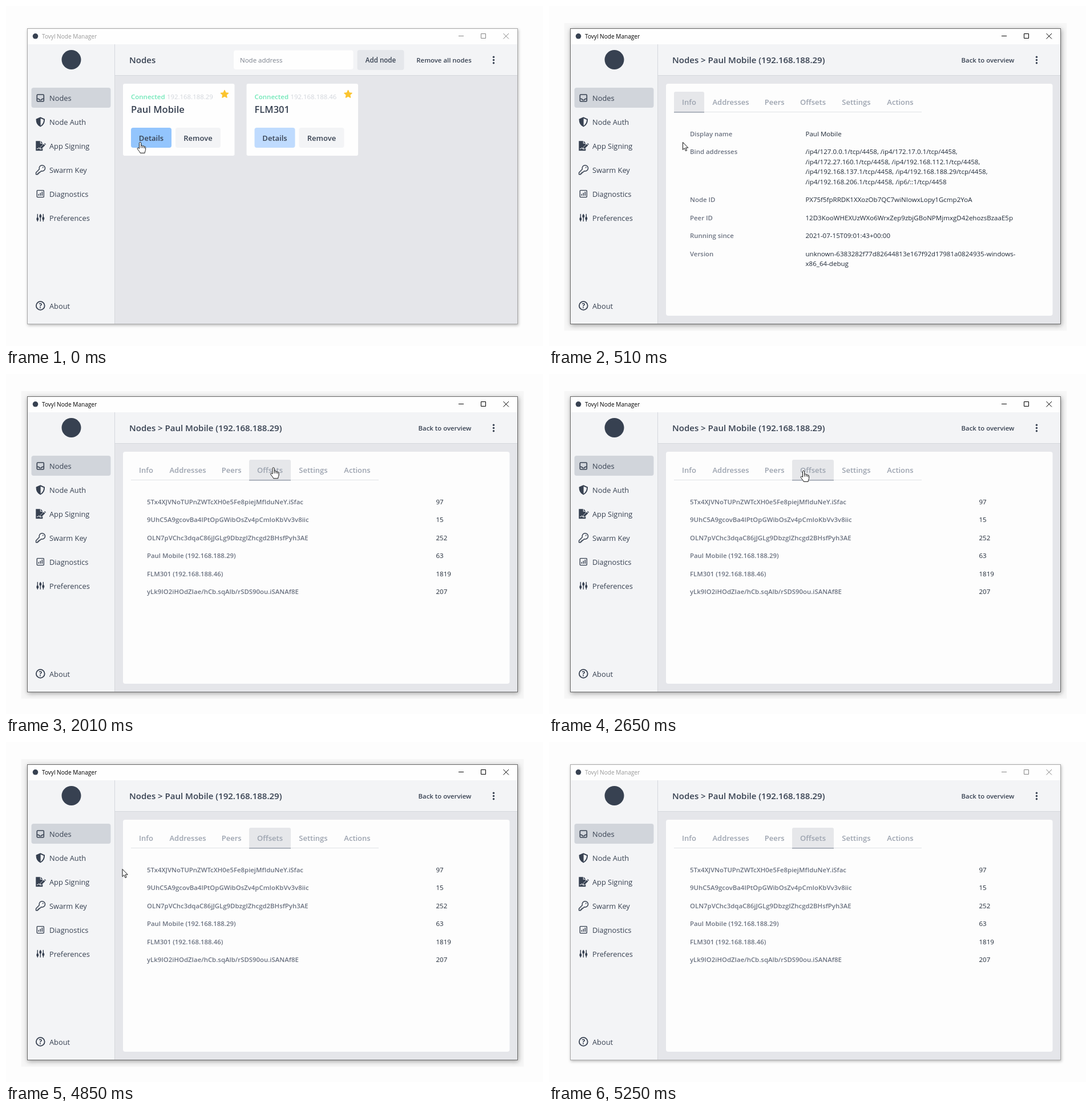
Write an HTML page that moves like this. It is 941 by 595 pixels and loops after 8 s.

```html
<!DOCTYPE html>
<html lang="en">
<head>
<meta charset="utf-8">
<title>Node Manager</title>
<style>
html, body { margin: 0; width: 100%; height: 100%; overflow: hidden; background: #fdfdfd; }
svg { position: absolute; left: 0; top: 0; font-family: "Open Sans", "Noto Sans", sans-serif; }
#window {
  position: absolute; left: 37px; top: 39px; width: 860px; height: 518px;
  box-sizing: border-box; background: #fefefe; border: 1px solid #a8a8a8;
  box-shadow: 1px 2px 5px rgba(0, 0, 0, .27);
}
#window.active {
  border-color: #686868;
  box-shadow: 1px 2px 8px rgba(0, 0, 0, .36), 0 1px 1px 10px rgba(0, 0, 0, .026);
}
#chrome { fill: #999; stroke: #858585; }
#chrome.active { fill: #000; stroke: #000; }
</style>
</head>
<body>
<div id="window"></div>
<svg id="stage" width="941" height="595" viewBox="0 0 941 595"></svg>
<script>
const INK = '#374151', MUTED = '#6b7280', PALE = '#9ca3af', SMALL = 11.4, VALUE = 11.55;
const DEVICE = 'Paul Mobile', IP = '192.168.188.29';

const rect = (x, y, w, h, fill, r = 0, extra = '') =>
  `<rect x="${x}" y="${y}" width="${w}" height="${h}" rx="${r}" fill="${fill}" ${extra}/>`;
const text = (x, y, str, size, fill = INK, weight = 400, anchor = 'start') =>
  `<text x="${x}" y="${y}" font-size="${size}" fill="${fill}" font-weight="${weight}" text-anchor="${anchor}">${str}</text>`;
const line = (d, width = 1.6, color = INK) =>
  `<path d="${d}" fill="none" stroke="${color}" stroke-width="${width}" stroke-linecap="round" stroke-linejoin="round"/>`;
const shape = (d, fill = INK) => `<path d="${d}" fill="${fill}"/>`;
const group = (id, body) => `<g id="${id}">${body}</g>`;
const button = (x, y, w, label, fill, size, id = '') =>
  rect(x, y, w, 35, fill, 4, id && `id="${id}"`) +
  text(x + w / 2, y + (size > 12 ? 22.5 : 21.5), label, size, INK, 600, 'middle');

// Icons are drawn around the middle of their row
const icons = {
  'Nodes': line('M-4.5-6h9a1.5 1.5 0 0 1 1.5 1.5v9a1.5 1.5 0 0 1-1.5 1.5h-9a1.5 1.5 0 0 1-1.5-1.5v-9a1.5 1.5 0 0 1 1.5-1.5ZM-6 1.5h3l1.5 2h3l1.5-2h3'),
  'Node Auth': line('M0-7.4 6.8-4.6C6.8 1 4.5 5.5 0 7.6-4.5 5.5-6.8 1-6.8-4.6Z', 1.9) +
    shape('M.3-7V7.5C-4.5 5.5-6.8 1-6.8-4.6Z'),
  'App Signing': shape('M-8-8.5H-.5V-4H4V-2L-1 3V6H2L4 4V8.5H-8Z') + shape('M.5-8.5 4-5H.5Z') +
    shape('M0 5V2.8L6-3.2 8.2-1 2.2 5Z') + shape('M6.7-4 7.6-4.9 9.8-2.7 8.9-1.8Z') +
    line('M-6 5h2l1-2 1.5 2h2', 1, '#f3f4f6'),
  'Swarm Key': line('M-1.9-1.2A5.2 5.2 0 1 1 1.4 2.1L-.6 4.2H-2.6V6.2H-4.6V8H-7.7V4.8Z', 1.5) +
    '<circle cx="4.4" cy="-4.2" r=".9" fill="#374151"/>',
  'Diagnostics': line('M-5-6H5a1 1 0 0 1 1 1V5a1 1 0 0 1-1 1H-5a1 1 0 0 1-1-1V-5a1 1 0 0 1 1-1Z', 1.4) +
    line('M-3 3V1M0 3V-1M3 3V-3', 1.5),
  'Preferences': line('M-5-6V6M0-6V6M5-6V6', 1.4) +
    line('M-5 1.5V3M0-3.5V-2M5 .5V2', 3.8),
  'About': '<circle r="7.4" fill="none" stroke="#374151" stroke-width="1.8"/>' +
    text(0, 4.3, '?', 12, INK, 700, 'middle')
};

const navItem = (label, y) =>
  `<g transform="translate(60.3 ${y})">${icons[label]}</g>` + text(76, y + 5, label, 12.8);

function star(cx, cy) {
  const points = Array.from({ length: 10 }, (_, i) => {
    const a = i * Math.PI / 5 - Math.PI / 2, r = i % 2 ? 3.3 : 6.9;
    return `${cx + r * Math.cos(a)},${cy + r * Math.sin(a)}`;
  });
  return `<polygon points="${points.join(' ')}" fill="#fbc42f" stroke="#fbc42f" stroke-width="1.4" stroke-linejoin="round"/>`;
}

const card = (x, name, ip, id) =>
  rect(x, 136, 195.5, 126, '#fefefe', 3) +
  text(x + 14, 163, 'Connected', 11.5, '#6ee7b7', 600) +
  text(x + 77, 163, ip, SMALL, '#d1d5db') +
  star(x + 178, 154.5) +
  text(x + 14, 187, name, 16.6, INK, 600) +
  button(x + 14, 213, 71, 'Details', '#bfdbfe', 13, id) +
  button(x + 92, 213, 79, 'Remove', '#f3f4f6', 13);

const chrome =
  '<text x="63" y="57" font-size="10.1" stroke="none">Tovyl Node Manager</text>' +
  '<path d="M793 52.5h9M832.5 48.5h8v8h-8ZM871.5 48l9.5 9.5M881 48l-9.5 9.5" fill="none"/>';

const shell =
  rect(38, 67, 152, 489, '#f3f4f6') + rect(190, 67, 706, 489, '#e5e6ea') +
  rect(191, 67, 705, 54, '#f3f4f6') + rect(190, 67, 1, 489, '#d5d8dd') + rect(191, 121, 705, 1, '#d5d8dd') +
  '<circle cx="51.5" cy="52.8" r="4.8" fill="#374151"/><circle cx="114.5" cy="94" r="17" fill="#374151"/>' +
  rect(44.5, 143, 139, 35, '#d1d5db', 4) +
  rect(44.5, 227, 139, 35, '#e5e7eb', 4, 'id="navHover"') +
  Object.keys(icons).map((label, i) => navItem(label, label === 'About' ? 524.5 : 161 + i * 41.9)).join('') +
  [89.3, 94.5, 99.7].map(y => `<circle cx="854.5" cy="${y}" r="1.7" fill="${INK}"/>`).join('');

const list =
  text(216, 100, 'Nodes', 15, INK, 600) +
  rect(399, 77.5, 209.5, 33.5, '#fefefe', 4) +
  text(410, 98.7, 'Node address', 11.5, '#7b818c') +
  button(615.5, 77, 82, 'Add node', '#e5e7eb', 11.6) +
  text(767.5, 98.5, 'Remove all nodes', SMALL, INK, 600, 'middle') +
  card(205, DEVICE, IP, 'details') + card(421.5, 'FLM301', '192.168.188.46');

const tabs = [['Info', 219, 53], ['Addresses', 272, 93], ['Peers', 364.5, 61.5],
  ['Offsets', 426, 73], ['Settings', 499, 79], ['Actions', 578, 75]];

const detail =
  text(216, 100, `Nodes &gt; ${DEVICE} (${IP})`, 15, INK, 600) +
  text(769, 98.5, 'Back to overview', SMALL, INK, 600, 'middle') +
  rect(205, 136, 677.5, 406, '#fdfdfd', 4) + rect(219, 185, 434, 1, '#e0e2e6') +
  tabs.map(([label, x, w]) =>
    rect(x, 150, w, 36, '#e6e7ea', 3, `id="bg${label}"`) +
    rect(x, 185, w, 1.6, PALE, 0, `id="bar${label}"`) +
    text(x + w / 2, 173, label, 13, PALE, 600, 'middle')).join('');

const ROW = 31.45, LINE = 17.5;

function rows(entries, valueX) {
  let y = 228;
  return entries.map(([label, ...values]) => {
    const row = text(247, y, label, SMALL, MUTED, 600) +
      values.map((v, i) => text(valueX, y + i * LINE, v, VALUE, '#1f2937')).join('');
    y += ROW + (values.length - 1) * LINE;
    return row;
  }).join('');
}

const info = rows([
  ['Display name', DEVICE],
  ['Bind addresses',
    '/ip4/127.0.0.1/tcp/4458, /ip4/172.17.0.1/tcp/4458,',
    '/ip4/172.27.160.1/tcp/4458, /ip4/192.168.112.1/tcp/4458,',
    '/ip4/192.168.137.1/tcp/4458, /ip4/192.168.188.29/tcp/4458,',
    '/ip4/192.168.206.1/tcp/4458, /ip6/::1/tcp/4458'],
  ['Node ID', 'PX75f5fpRRDK1XXozOb7QC7wiNIowxLopy1Gcmp2YoA'],
  ['Peer ID', '12D3KooWHEXUzWXo6WrxZep9zbjGBoNPMjmxgD42ehozsBzaaE5p'],
  ['Running since', '2021-07-15T09:01:43+00:00'],
  ['Version', 'unknown-6383282f77d82644813e167f92d17981a0824935-windows-', 'x86_64-debug']
], 449.5);

const offsets = rows([
  ['5Tx4XJVNoTUPnZWTcXH0e5Fe8piejMfIduNeY.iSfac', 97],
  ['9UhC5A9gcovBa4IPtOpGWibOsZv4pCmIoKbVv3v8iic', 15],
  ['OLN7pVChc3dqaC86jJGLg9DbzgIZhcgd2BHsfPyh3AE', 252],
  [`${DEVICE} (${IP})`, 63],
  ['FLM301 (192.168.188.46)', 1819],
  ['yLk9IO2iHOdZIae/hCb.sqAlb/rSDS90ou.iSANAf8E', 207]
], 753.5);

const cursors = {
  arrow: 'M.5.5V13.6L3.4 10.8 5.5 15.6 7.6 14.7 5.5 10.1H9.8Z',
  hand: 'M-1.5 11.5V1.7C-1.5-.2 1.7-.2 1.7 1.7V6.8C2.2 5.6 4.6 5.9 4.7 7.4 5.4 6.4 7.3 6.8 7.4 8.3 8.3 7.6 9.6 8.2 9.6 9.6V13.5C9.6 15 8.2 16.5 8.2 19.3H.2C0 17.5-2.5 15.5-4.6 12.2-5.6 10.4-3.3 9.2-1.5 11.5ZM1.7 6.8V10.5M4.7 7.4V10.5M7.4 8.3V11'
};

document.getElementById('stage').innerHTML =
  shell + group('chrome', chrome) + group('list', list) +
  group('detail', detail + group('info', info) + group('offsets', offsets)) +
  '<path id="cursor" fill="#fff" stroke="#111" stroke-linejoin="round"/>';

// time, view, window active, hovered part, cursor kind, cursor x, cursor y
const steps = [
  [0, 'list', false, 'details', 'hand', 235, 238],
  [390, 'list', true, 'details', 'hand', 235, 238],
  [510, 'info', true, '', 'arrow', 234, 238],
  [880, 'info', true, '', 'arrow', 275, 226],
  [1000, 'info', true, 'Offsets', 'hand', 440, 172],
  [1120, 'info', true, 'Offsets', 'hand', 468.5, 163.5],
  [2010, 'offsets', true, 'Offsets', 'hand', 468.5, 163.5],
  [2650, 'offsets', true, 'Offsets', 'hand', 446, 169],
  [2770, 'offsets', true, '', 'arrow', 360, 195],
  [2890, 'offsets', true, '', 'arrow', 285, 214],
  [3010, 'offsets', true, '', 'arrow', 240, 221],
  [3130, 'offsets', true, '', 'arrow', 222.5, 222],
  [4850, 'offsets', true, '', 'arrow', 203.5, 222],
  [5100, 'offsets', true, 'nav', 'hand', 160, 232],
  [5250, 'offsets', false, '', '', 0, 0]
];

const LOOP = 8000, start = performance.now();
const el = id => document.getElementById(id);
const show = (id, on) => { el(id).style.display = on ? '' : 'none'; };
let current;

function apply([, view, active, hover, kind, x, y]) {
  el('window').classList.toggle('active', active);
  el('chrome').classList.toggle('active', active);
  show('list', view === 'list');
  show('detail', view !== 'list');
  show('info', view === 'info');
  show('offsets', view === 'offsets');
  show('navHover', hover === 'nav');
  el('details').setAttribute('fill', hover === 'details' ? '#93c5fd' : '#bfdbfe');
  for (const [label] of tabs) {
    const selected = label.toLowerCase() === view;
    show('bg' + label, selected || label === hover);
    show('bar' + label, selected);
  }
  show('cursor', kind);
  el('cursor').setAttribute('d', cursors[kind] || '');
  el('cursor').setAttribute('transform', `translate(${x} ${y})`);
}

function frame() {
  const t = (performance.now() - start) % LOOP;
  const step = steps.findLast(s => s[0] <= t);
  if (step !== current) apply(current = step);
  requestAnimationFrame(frame);
}
frame();
</script>
</body>
</html>
```
